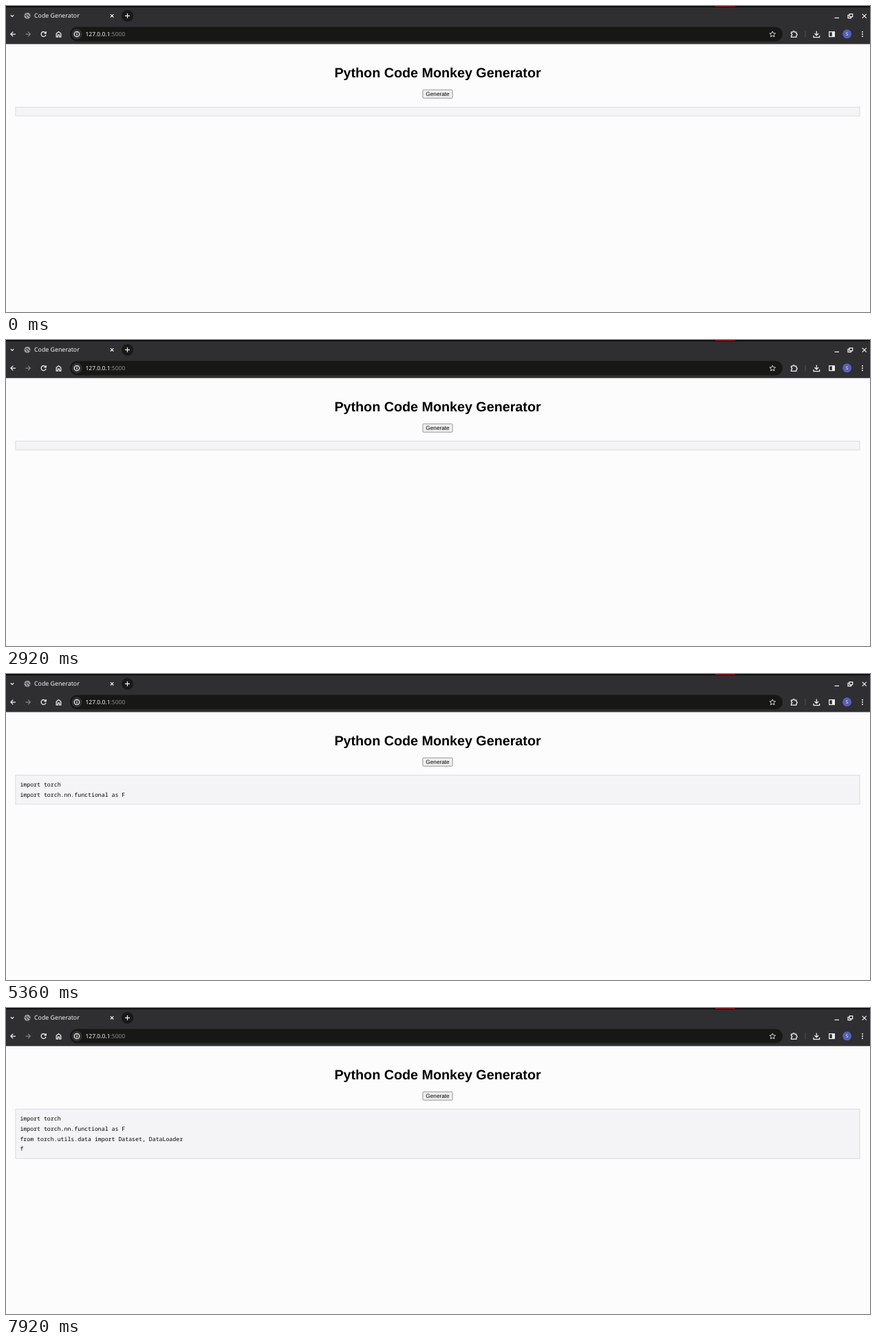
Write an HTML page that moves like this. It is 1256 by 446 pixels and loops after 8000 ms.

```html
<!DOCTYPE html>
<html lang="en">
<head>
<meta charset="utf-8">
<title>Code Generator</title>
<style>
  html, body { margin: 0; width: 100%; height: 100%; overflow: hidden; background: #fcfcfd; }
  svg { display: block; text-rendering: geometricPrecision; }
  .ui { font-family: "Noto Sans", "Open Sans", sans-serif; fill: #f4f4f4; }
  .page { font-family: "Liberation Sans", Arial, sans-serif; text-anchor: middle; fill: #000; }
  .code { font: 8.22px "Noto Sans Mono", "DejaVu Sans Mono", monospace; white-space: pre; fill: #000; }
  .icon { fill: none; stroke: #f0f0f0; stroke-width: 1.25; }
  .solid { fill: #f0f0f0; stroke: none; }
</style>
</head>
<body>
<svg width="1256" height="446" viewBox="0 0 1256 446">
  <!-- Browser frame -->
  <rect width="1256" height="55.5" fill="#2f2f32"/>
  <rect width="1256" height="2" fill="#0e0f0e"/>
  <rect x="1031" width="29" height="1" fill="#a8101c"/>
  <rect x="93" y="30.5" width="1036" height="21" rx="10.5" fill="#171815"/>
  <circle cx="176.5" cy="14.3" r="8.6" fill="#181917"/>
  <circle cx="103" cy="41" r="7.6" fill="#303132"/>

  <!-- Tab strip -->
  <g class="icon">
    <path d="M6.8 13.2 9 15.4 11.2 13.2"/>
    <path d="M151.9 12.1l4.4 4.4m0-4.4l-4.4 4.4"/>
    <path d="M173 14.3h7M176.5 10.8v7"/>
    <path d="M1204.5 17.4h6.5"/>
    <path d="M1226.2 11.6h4.5v4h-4.500z M1226 13.400h-2v4.200h4.500v-2"/>
    <path d="M1244.800 11.600l6 6m0-6l-6 6"/>
  </g>
  <circle cx="31" cy="14.3" r="4.5" fill="#a5a7a9"/>
  <path d="M27.500 13l2.500 1.800 1 3.300M30 10.800l.6 2.200 2.200.4.600 1.800 1.800.600" fill="none" stroke="#3b3c3e" stroke-width="1.200"/>
  <text class="ui" x="41" y="17.300" font-size="8.800">Code Generator</text>

  <!-- Toolbar -->
  <g class="icon">
    <path d="M14 41H7M10.300 37.600 6.900 41l3.400 3.400"/>
    <path d="M28.300 41h7M32 37.600l3.400 3.400-3.400 3.400" stroke="#818284"/>
    <path d="M57.700 39.300A3.500 3.500 0 1 0 58 42M58.200 37v2.800h-2.800"/>
    <path d="M73.200 40.200l3.300-2.700 3.300 2.700v4.800h-2.200v-3h-2.200v3h-2.200z"/>
    <circle cx="103" cy="41" r="3.700"/>
    <path d="M103 40.500v2.500M103 38.800v1"/>
    <path d="M1114.300 36.900l1.300 2.800 3 .300-2.300 2 .700 3-2.700-1.600-2.700 1.600.700-3-2.300-2 3-.300z" stroke-width="1" stroke="#d8d8d8"/>
    <path d="M1141.500 38h2.300a1.300 1.300 0 0 1 2.600 0h2.500v2.400a1.300 1.300 0 0 1 0 2.600v2.300h-7.400v-2.300a1.300 1.300 0 0 0 0-2.600z"/>
    <path d="M1162 36.500v9" stroke="#505154" stroke-width="1"/>
    <path d="M1178.300 36.500v6M1175.500 40l2.800 2.800 2.800-2.800M1174 43v2.500h8.600V43"/>
    <rect x="1196.700" y="37.600" width="7.600" height="7"/>
  </g>
  <g class="solid">
    <rect x="1200.800" y="37.500" width="3.700" height="7.200"/>
    <circle cx="1245" cy="37.700" r="1"/>
    <circle cx="1245" cy="41" r="1"/>
    <circle cx="1245" cy="44.300" r="1"/>
  </g>
  <circle cx="1222.600" cy="40.800" r="6.500" fill="#5560b8"/>
  <text class="ui" x="1222.600" y="43.300" font-size="6.500" text-anchor="middle">S</text>
  <text class="ui" x="115.500" y="44.300" font-size="8.500">127.0.0.1<tspan fill="#8c8d8b">:5000</tspan></text>

  <!-- Page -->
  <text class="page" x="627.500" y="103.700" font-size="19.730" font-weight="bold">Python Code Monkey Generator</text>
  <rect x="605.900" y="122.200" width="43.200" height="12.100" rx="1.200" fill="#efefef" stroke="#808080" stroke-width=".8"/>
  <text class="page" x="627.500" y="131" font-size="8.220">Generate</text>
  <rect id="box" x="13.900" y="147.300" width="1227.200" height="13" fill="#f4f4f6" stroke="#d8d8da" stroke-width=".8"/>
  <g id="code"></g>
</svg>
<script>
  const LOOP = 8000, TICK = 40, TYPE_START = 3125, CHAR_MS = 50, LINE = 14.8;
  const SOURCE = `import torch
import torch.nn.functional as F
from torch.utils.data import Dataset, DataLoader
f`;
  const box = document.getElementById("box");
  const code = document.getElementById("code");

  const rows = SOURCE.split("\n").map((_, i) => {
    const row = document.createElementNS("http://www.w3.org/2000/svg", "text");
    row.setAttribute("class", "code");
    row.setAttribute("x", 20.4);
    row.setAttribute("y", 164 + i * LINE);
    return code.appendChild(row);
  });

  function render(time) {
    const t = Math.floor((time % LOOP) / TICK) * TICK;
    const count = Math.max(0, Math.floor((t - TYPE_START) / CHAR_MS));
    const lines = SOURCE.slice(0, count).split("\n");
    rows.forEach((row, i) => { row.textContent = lines[i] || ""; });
    // A trailing newline adds no height until the next character arrives.
    const filled = lines.filter(Boolean).length;
    box.setAttribute("height", 13 + filled * LINE);
  }

  const start = performance.now();
  function loop() {
    render(performance.now() - start);
    requestAnimationFrame(loop);
  }
  loop();
</script>
</body>
</html>
```
